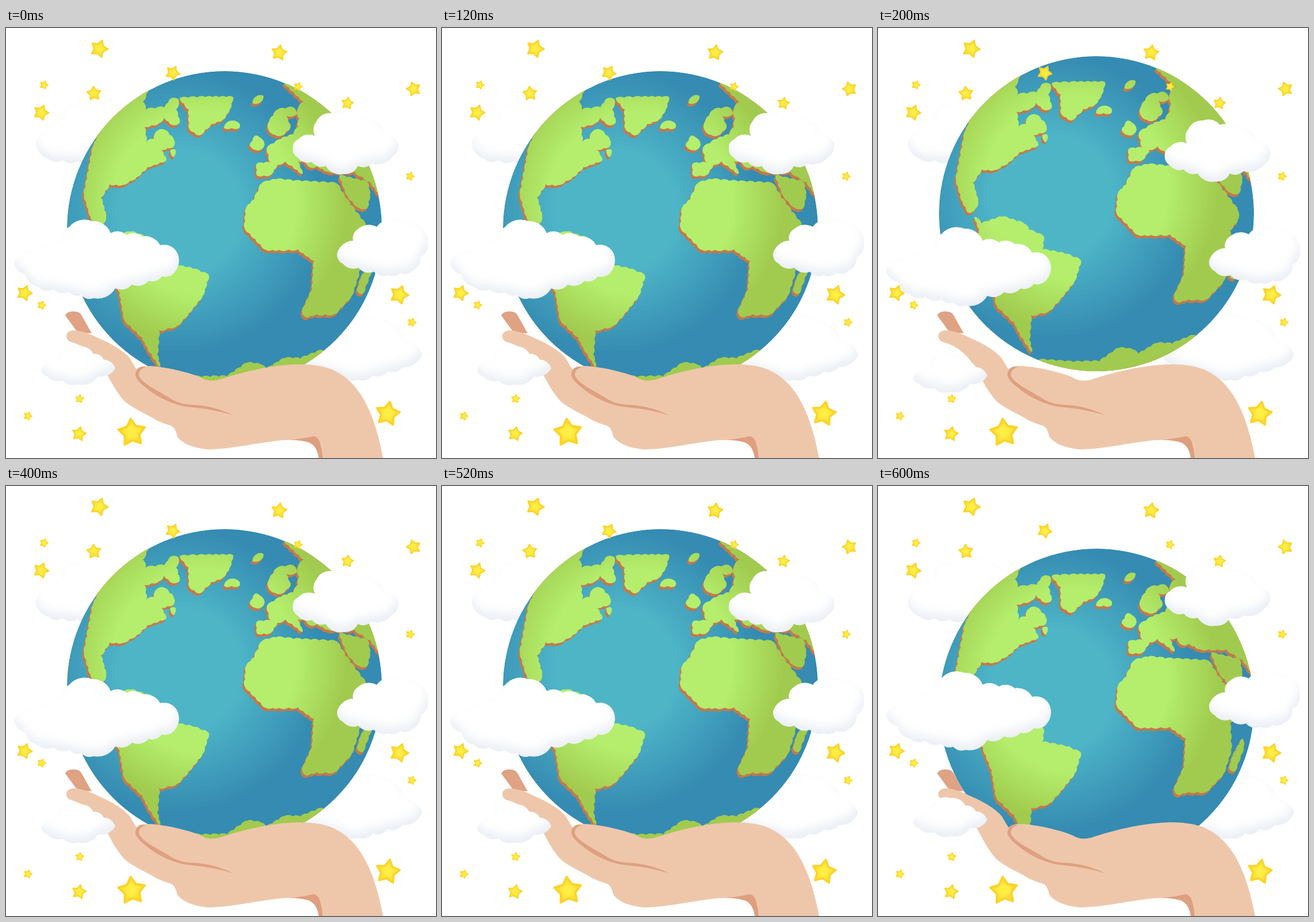
An HTML page for the animation above (800 ms loop, 748 by 748 pixels).

```html
<!DOCTYPE html>
<html lang="en">
<head>
<meta charset="utf-8">
<title>Globe in hand</title>
<style>
html, body { margin: 0; width: 100%; height: 100%; overflow: hidden; background: #fff; }
svg { display: block; width: 100%; height: 100%; }
</style>
</head>
<body>
<svg viewBox="0 0 748 748">
  <defs>
    <radialGradient id="sea" gradientUnits="userSpaceOnUse" cx="303" cy="320" r="248">
      <stop offset=".42" stop-color="#4eb5c7"/><stop offset=".72" stop-color="#419fbc"/><stop offset="1" stop-color="#358bb2"/>
    </radialGradient>
    <radialGradient id="grass" gradientUnits="userSpaceOnUse" cx="345" cy="305" r="275">
      <stop offset=".58" stop-color="#b4ee6c"/><stop offset=".9" stop-color="#a1cb4e"/>
    </radialGradient>
    <radialGradient id="gold">
      <stop offset=".3" stop-color="#ffee44"/><stop offset="1" stop-color="#fdd92f"/>
    </radialGradient>
    <clipPath id="disc"><circle cx="380" cy="349" r="274"/></clipPath>
    <filter id="soft" x="-20%" y="-20%" width="140%" height="140%"><feGaussianBlur stdDeviation="8"/></filter>
  </defs>

  <g id="back"></g>

  <g id="globe" clip-path="url(#disc)">
    <circle cx="380" cy="349" r="274" fill="url(#sea)"/>
    <path id="cliff" fill="#c4794b" transform="translate(-2.5 4.5)"/>
    <path id="land" fill="url(#grass)"/>
  </g>

  <g id="hand">
    <path fill="#dfa283" d="M103 500Q106 493 117 493Q128 493 131 499L149 531L125 530Z"/>
    <path fill="#eec7ab" d="M105 536Q105 527 117 526Q134 526 160 539Q198 555 215 574L227 594Q233 588 243 588C270 587 324 600 341 609Q352 616 370 612C410 599 455 587 507 585Q553 585 575 598C620 622 642 675 656 748H546Q541 724 526 720Q508 715 480 717C420 724 390 733 350 733Q312 729 298 711Q294 692 284 691Q262 684 253 677Q213 657 205 648Q191 632 180 610C162 575 145 555 112 546Q105 543 105 536Z"/>
    <path fill="#dfa080" d="M236 589Q225 592 225 604Q227 613 240 623C264 644 295 658 325 660Q360 663 396 674Q368 660 335 656C310 655 301 653 287 645C266 632 230 615 231 602Q232 593 243 590Z"/>
    <path fill="#df9f7f" d="M490 717Q515 715 535 710Q543 711 546 721Q550 734 551 748H544Q541 727 527 721Q512 716 490 717Z"/>
  </g>

  <g id="front"></g>
  <g id="stars" fill="url(#gold)" stroke="#fcd329" stroke-linejoin="round"></g>
</svg>
<script>
const $ = id => document.getElementById(id);

// Clockwise polygon whose sides are split into outward bumps about `size` wide
function bumps(text, size, round) {
  const p = text.trim().split(/\s+/).map(s => s.split(',').map(Number));
  let d = 'M' + p[0];
  p.forEach(([x, y], i) => {
    const [u, v] = p[(i + 1) % p.length];
    const length = Math.hypot(u - x, v - y), n = Math.ceil(length / size - .4) || 1;
    const r = (length / n * round).toFixed(1);
    for (let k = 1; k <= n; k++) {
      d += `A${r} ${r} 0 0 1 ${(x + (u - x) * k / n).toFixed(1)} ${(y + (v - y) * k / n).toFixed(1)}`;
    }
  });
  return d + 'Z';
}

const lands = {
  northAmerica: `140,100 250,100 238,128 243,142 276,138 288,122 300,124 296,142 302,165 290,169 275,156 266,166
    241,172 244,198 257,193 264,178 276,177 292,194 292,206 270,212 279,230 246,242 228,259 203,273 180,272
    165,295 174,328 170,340 158,348 147,328 136,290 152,205 162,185 130,180`,
  newfoundland: '286,212 295,212 291,225',
  southAmerica: `168,354 180,366 216,354 254,366 263,377 288,388 286,411 326,419 353,430 342,466 318,496 298,518
    266,526 263,568 268,590 246,556 237,538 206,508 198,460 183,422 176,376`,
  greenland: '302,122 347,120 395,120 389,142 378,159 357,167 336,187 319,176 318,142',
  iceland: '379,174 388,162 406,166 406,174',
  svalbard: '429,131 435,119 448,118 443,129',
  britain: '434,187 441,190 450,203 440,213 424,205',
  scandinavia: '472,142 500,138 506,150 487,153 495,173 480,187 468,186 456,176 458,162',
  eurasia: `483,95 560,90 660,200 665,310 634,268 606,250 560,250 541,240 530,243 520,230 507,232 516,254 498,240
    486,232 472,238 460,256 437,257 436,236 460,234 454,208 478,193 500,185 508,172 510,158 508,140 518,128`,
  arabia: '580,256 629,268 633,290 628,314 612,312 594,292',
  africa: `446,269 470,263 500,266 575,270 590,295 626,343 626,360 612,378 614,425 601,466 571,498 540,498 521,503
    515,494 533,455 536,405 508,385 475,386 452,386 415,348 418,312 432,298`,
  madagascar: '634,405 636,420 620,463 611,458 617,436',
  antarctica: '280,603 340,607 385,606 420,582 443,585 453,593 485,574 512,575 550,560 600,600 380,660'
};

const backClouds = [
  '52,200 74,178 96,165 102,143 134,136 160,123 190,133 240,160 205,235 150,234 74,228',
  '497,575 572,535 584,512 620,502 670,515 692,545 724,568 690,590 612,612 520,585'
];
const frontClouds = [
  `499,208 508,194 538,188 540,163 565,148 595,156 640,163 658,187 682,200 672,224 636,236 612,240 588,254
    556,240 508,226`,
  `14,408 50,390 98,370 110,346 150,336 182,357 238,363 268,378 296,388 294,424 248,440 190,453 152,470
    110,459 55,450`,
  '576,392 604,370 612,350 645,346 676,335 718,345 734,375 708,422 664,430 640,424 586,410',
  '61,595 90,580 98,562 125,554 152,567 170,577 190,592 160,606 125,620 72,606'
];

// Pale shape with a blurred white body inside, leaving a soft shaded underside
function cloud(points, id) {
  const d = bumps(points, 30, .85);
  return `<clipPath id="${id}"><path d="${d}"/></clipPath><path d="${d}" fill="#ebeff5"/>
    <g clip-path="url(#${id})"><path d="${d}" fill="#fff" filter="url(#soft)" transform="translate(-2 -12)"/></g>`;
}

function star([x, y, r, tilt]) {
  let points = '';
  for (let i = 0; i < 10; i++) {
    const a = (tilt - 90 + i * 36) * Math.PI / 180, q = r * (i % 2 ? .53 : .96);
    points += `${(x + q * Math.cos(a)).toFixed(1)},${(y + q * Math.sin(a)).toFixed(1)} `;
  }
  return `<polygon points="${points}" stroke-width="${r * .16}"/>`;
}

// x, y, radius, tilt in degrees
const stars = [
  [162, 36, 16, 20], [475, 43, 14, 10], [290, 78, 13, 26], [66, 99, 8, 20], [153, 114, 13, -5],
  [61, 147, 14, 20], [508, 102, 8, 20], [594, 131, 11, 10], [709, 106, 13, -16], [703, 258, 8, 20],
  [32, 461, 14, 20], [62, 482, 8, 20], [684, 464, 17, 20], [706, 512, 8, 20], [128, 645, 8, 8],
  [38, 675, 8, 20], [127, 706, 13, 12], [219, 704, 25, -5], [664, 671, 22, 10]
];

const coast = Object.values(lands).map(p => bumps(p, 14, 1)).join('');
$('land').setAttribute('d', coast);
$('cliff').setAttribute('d', coast);
$('back').innerHTML = backClouds.map((p, i) => cloud(p, 'b' + i)).join('');
$('front').innerHTML = frontClouds.map((p, i) => cloud(p, 'c' + i)).join('');
$('stars').innerHTML = stars.map(star).join('');

const globeY = [0, -26, 0, 34], cloudY = [0, 13, 0, -11];
const shift = (id, y) => $(id).setAttribute('transform', `translate(0 ${y})`);

function draw(now) {
  const step = Math.floor(now / 200) % 4;
  shift('globe', globeY[step]);
  shift('front', cloudY[step]);
  requestAnimationFrame(draw);
}
draw(0);
</script>
</body>
</html>
```
